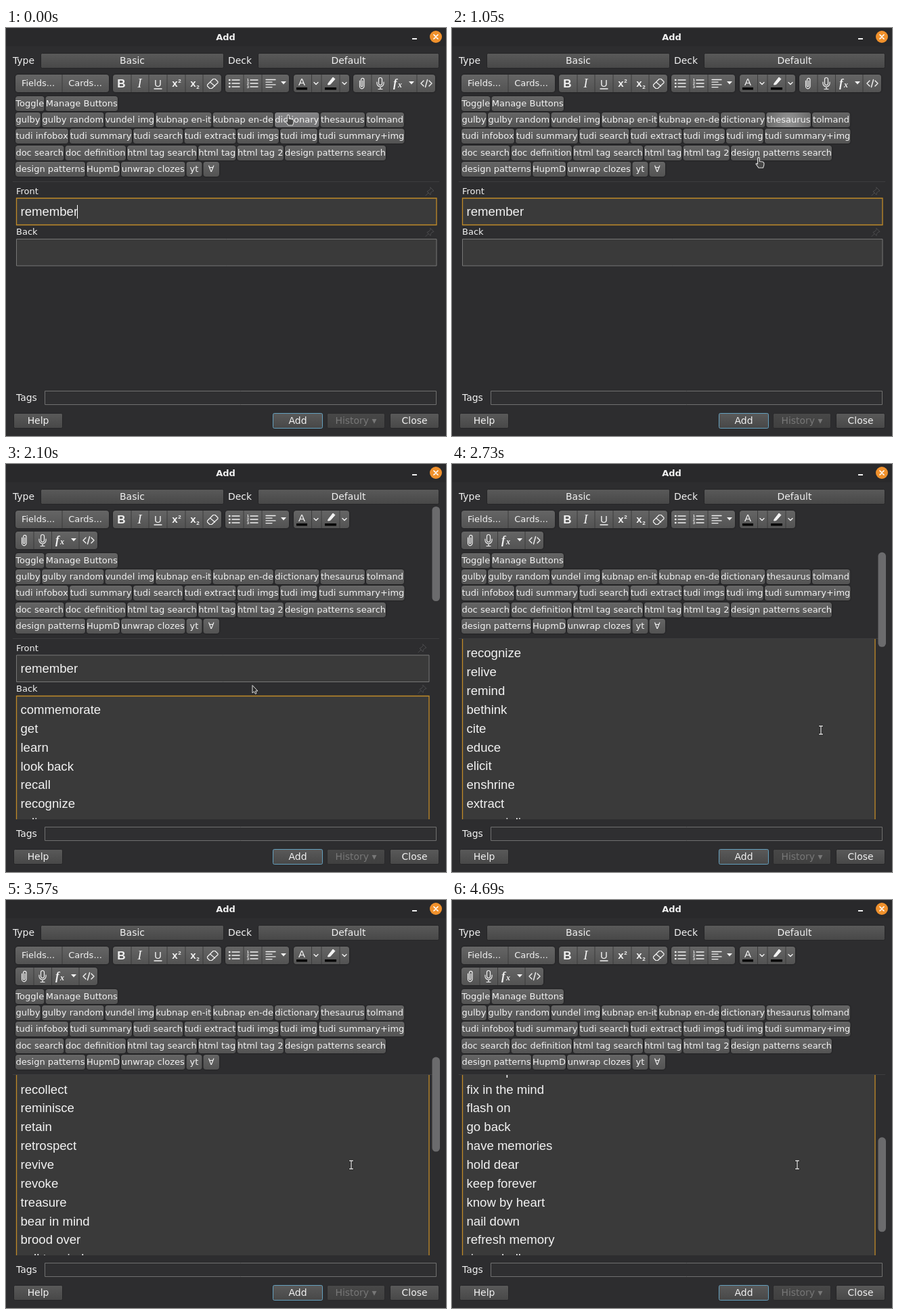
Recreate the animation shown at these times as an HTML page with a canvas. Size 650 px wide and 604 px high, loop 4830 ms.

```html
<!DOCTYPE html>
<html lang="en">
<head>
<meta charset="utf-8">
<title>Add</title>
<style>
html, body { margin: 0; width: 650px; height: 604px; overflow: hidden; background: #2d2d2f; }
canvas { display: block; }
</style>
</head>
<body>
<canvas id="stage" width="650" height="604"></canvas>
<script>
const g = document.getElementById('stage').getContext('2d');
const LOOP = 4830, STEP = 70, LINE = 27.857;
const CLICKED = 700, FILLED = 1260;
const SANS = '"DejaVu Sans", sans-serif', ARIAL = '"Liberation Sans", Arial, sans-serif';
const UI = '13.93px ' + SANS, SMALL = '13px ' + SANS, FIELD = '18.57px ' + ARIAL;
const INK = '#f2f2f2', ORANGE = '#c08a28';

// Each row: labels, then left edges followed by the right end
const rows = [
  ['Toggle|Manage Buttons', [14, 58.5, 167]],
  ['gulby|gulby random|vundel img|kubnap en-it|kubnap en-de|dictionary|thesaurus|tolmand',
    [14, 53, 146.5, 221, 305.5, 397, 464.5, 532, 590]],
  ['tudi infobox|tudi summary|tudi search|tudi extract|tudi imgs|tudi img|tudi summary+img',
    [14, 94, 188, 263.5, 341.5, 405, 462, 590.5]],
  ['doc search|doc definition|html tag search|html tag|html tag 2|design patterns search',
    [14, 87.5, 179, 284, 341.5, 412, 563]],
  ['design patterns|HupmD|unwrap clozes|yt|∀', [14, 119, 170, 266.5, 291.5, 317]]
].map(([names, xs]) => ({ names: names.split('|'), xs }));

const words = ('commemorate,get,learn,look back,recall,recognize,relive,remind,bethink,cite,educe,' +
  'elicit,enshrine,extract,memorialize,memorize,mind,recollect,reminisce,retain,retrospect,revive,' +
  'revoke,treasure,bear in mind,brood over,call to mind,call up,conjure up,dig into the past,' +
  'dwell upon,fix in the mind,flash on,go back,have memories,hold dear,keep forever,' +
  'know by heart,nail down,refresh memory,ring a bell,summon up,think back').split(',');

// Keys: time, then values
const scrollKeys = [[2450, 0], [2730, 8], [3150, 14], [3290, 14], [3570, 20], [3710, 22], [4270, 22], [4690, 34]];
const mouseKeys = [[0, 419, 136], [560, 497, 138], [910, 497, 138], [1050, 455, 199], [1260, 430, 262],
  [1610, 430, 262], [1890, 392, 420], [2100, 367, 334], [2170, 367, 334], [2520, 545, 394],
  [3220, 545, 394], [3430, 510, 392]];

function track(keys, t) {
  const i = keys.findIndex(k => k[0] > t);
  if (i === 0) return keys[0].slice(1);
  if (i < 0) return keys[keys.length - 1].slice(1);
  const a = keys[i - 1], b = keys[i], p = (t - a[0]) / (b[0] - a[0]);
  return a.slice(1).map((v, n) => v + (b[n + 1] - v) * p);
}

function text(s, x, y, font, color = INK, align = 'left') {
  g.font = font;
  g.fillStyle = color;
  g.textAlign = align;
  g.fillText(s, x, y);
}

function rect(x, y, w, h, r, fill, stroke, width = 1) {
  g.beginPath();
  g.roundRect(x, y, w, h, r);
  if (fill) { g.fillStyle = fill; g.fill(); }
  if (stroke) { g.strokeStyle = stroke; g.lineWidth = width; g.stroke(); }
}

function shade(y, h, top, bottom) {
  const s = g.createLinearGradient(0, y, 0, y + h);
  s.addColorStop(0, top);
  s.addColorStop(1, bottom);
  return s;
}

function raised(x, y, w, h, r = 3, top = '#656565', bottom = '#535353') {
  g.save();
  g.shadowColor = 'rgba(0,0,0,.5)';
  g.shadowBlur = 3;
  rect(x, y, w, h, r, shade(y, h, top, bottom));
  g.restore();
}

function path(d, x, y, stroke = INK, width = 1.3, fill) {
  const p = new Path2D(d);
  g.save();
  g.translate(x, y);
  g.lineJoin = g.lineCap = 'round';
  if (fill) { g.fillStyle = fill; g.fill(p); }
  if (stroke) { g.strokeStyle = stroke; g.lineWidth = width; g.stroke(p); }
  g.restore();
}

function qtButton(label, x, y, w, border = '#252527', color = INK, flat) {
  rect(x + .5, y + .5, w - 1, 22, 2, flat ? shade(y, 22, '#484848', '#404040') : shade(y, 22, '#5a5a5a', '#484848'), border);
  text(label, x + w / 2, y + 16, UI, color, 'center');
}

function group(x, y, ...edges) {
  const w = edges[edges.length - 1];
  raised(x, y, w, 26, 4);
  g.fillStyle = '#3c3c3c';
  for (const e of edges.slice(0, -1)) g.fillRect(x + e - .5, y, 1, 26);
}

const caret = (x, y) => path('M-4 -2H4L0 2.5Z', x, y, null, 0, INK);
const chevron = (x, y) => path('M-3 -1.5L0 1.5L3 -1.5', x, y, INK, 1.4);

function insertTools(x, y) {
  group(x, y, 27, 53.5, 94, 121);
  path('M-3 -4V4A3 3.5 0 0 0 3.5 4V-5A2.2 2.5 0 0 0 -1 -5V3.5A1 1.2 0 0 0 1.3 3.5V-4', x + 12.5, y + 13, INK, 1.2);
  path('M-2.5 -6A2.5 2.5 0 0 1 2.5 -6V0A2.5 2.5 0 0 1 -2.5 0ZM-5 -2V0A5 5 0 0 0 5 0V-2M0 5V8.5M-3 8.5H3', x + 40, y + 13, INK, 1.2);
  text('f', x + 59, y + 18, 'italic bold 17px "Liberation Serif", serif');
  text('x', x + 66, y + 19, 'italic bold 12px "Liberation Serif", serif');
  caret(x + 86, y + 12);
  path('M-4 -4L-8 0L-4 4M4 -4L8 0L4 4M1.5 -5.5L-1.5 5.5', x + 108, y + 13, INK, 1.4);
}

function toolbar(wrapped) {
  const y = 69, m = 82;
  group(14, y, 69, 138);
  text('Fields...', 47.5, 86, SMALL, INK, 'center');
  text('Cards...', 117, 86, SMALL, INK, 'center');

  group(158, y, 27, 53, 80, 107, 133, 160);
  text('B', 170.5, 88, 'bold 17px ' + ARIAL, INK, 'center');
  text('I', 197.5, 88, 'italic 19px "Liberation Serif", serif', INK, 'center');
  text('U', 224.5, 87, '15px ' + ARIAL, INK, 'center');
  path('M-5.5 0H5.5', 224.5, 90);
  text('x', 249.5, 87, 'bold 15px ' + ARIAL, INK, 'center');
  text('2', 256.5, 81, 'bold 8px ' + ARIAL, INK, 'center');
  text('x', 276.5, 87, 'bold 15px ' + ARIAL, INK, 'center');
  text('2', 283.5, 90, 'bold 8px ' + ARIAL, INK, 'center');
  path('M-7.5 2L1 -6.5H4L8 -2.5V-1L-1 7.5H-4L-7.5 4ZM-3.5 -2L3.5 4', 305, m, INK, 1.2);

  group(324, y, 27, 54, 94);
  for (const d of [-5, 0, 5]) {
    path('M-3 0H8', 337, m + d, INK, 1.4);
    path('M-7 0H-6.5', 337, m + d, INK, 2.4);
    path('M-3 0H8', 364, m + d, INK, 1.4);
    text(d / 5 + 2, 357.5, m + d + 2, 'bold 6px ' + ARIAL, INK, 'center');
  }
  [14, 9, 14, 9].forEach((w, i) => path(`M0 0H${w}`, 384, 76.5 + i * 3.7, INK, 1.3));
  caret(410, 81);

  group(425, y, 26.5, 41, 68, 82);
  text('A', 437, 85, '15px ' + ARIAL, INK, 'center');
  path('M-4 3L3 -6L6 -3.5L-1 4.5L-4 5Z', 480, 79, INK, 1, INK);
  g.fillStyle = '#000';
  g.fillRect(429, 88, 16, 3.5);
  g.fillRect(471, 88, 17, 3.5);
  chevron(458, m);
  chevron(500, m);
  wrapped ? insertTools(14, 100) : insertTools(513, y);
}

function actions(dy, hot, glow) {
  rows.forEach(({ names, xs }, r) => names.forEach((name, i) => {
    const x = xs[i], w = xs[i + 1] - x - 2, y = Math.round(101.1 + r * 24.14) + dy;
    if (name === hot) raised(x, y, w, 22, 4, '#858587', '#717173');
    else raised(x, y, w, 22, 4);
    if (name === glow) {
      const s = g.createRadialGradient(x + w / 2, y + 11, 2, x + w / 2, y + 11, w / 2);
      s.addColorStop(0, '#929292');
      s.addColorStop(1, '#6a6a6a');
      rect(x, y, w, 22, 4, s);
    }
    text(name, x + w / 2, y + 15, SMALL, INK, 'center');
  }));
}

const pin = (x, y) => path('M1 -6L6 -1L4 -.5L1.5 2L1 5L-4 0L-1 -1.5L1 -4ZM-2 2L-6 6', x, y, '#4b4b4d', 1);

function field(label, y, right, h, focus) {
  text(label, 15, Math.round(y + 4.6), SMALL);
  pin(right - 9.5, y + 1);
  rect(15.5, y + 11, right - 15, h, 0, '#3a3a3a', focus ? ORANGE : '#767676', focus ? 1.3 : 1);
}

function cursor(shape, x, y) {
  if (shape === 'hand')
    path('M-3.5 2V-6A1.4 1.4 0 0 1 -.7 -6V-1.5L3.5 -1Q6 -.5 6 2Q6 5 4.5 8H-2L-6 2.5Q-6 .5 -3.5 2.5', x, y, '#dedede', 1.1, '#454545');
  else if (shape === 'beam') {
    const d = 'M-2.5 -6H2.5M0 -6V6M-2.5 6H2.5';
    path(d, x, y, '#222', 3.2);
    path(d, x, y, '#ddd', 1.3);
  } else path('M-3 -6V5L-.5 2.8L1.5 6.5L3 5.5L1.5 2H4.5Z', x, y, '#ddd', 1, '#2a2a2a');
}

function chrome() {
  g.fillStyle = '#2d2d2f';
  g.fillRect(0, 0, 650, 604);
  g.fillStyle = '#29292b';
  g.fillRect(0, 0, 650, 27);
  text('Add', 324.5, 18, 'bold 13px ' + SANS, INK, 'center');
  g.fillRect(600, 15, 7, 2);
  g.beginPath();
  g.arc(635, 13, 9, 0, 7);
  g.fillStyle = '#f0912c';
  g.fill();
  path('M-3 -3L3 3M3 -3L-3 3', 635, 13, '#fff', 1.7);

  text('Type', 10, 53, UI);
  qtButton('Basic', 51, 37, 271);
  text('Deck', 328, 53, UI);
  qtButton('Default', 372, 37, 268);

  text('Tags', 15, 552, UI);
  rect(57.5, 537.5, 578, 20, 0, '#2f2f31', '#707070');
  qtButton('Help', 11, 570, 73);
  qtButton('Add', 394, 570, 74, '#64a0be');
  qtButton('History ▾', 474, 570, 86, '#29292b', '#777', true);
  qtButton('Close', 567, 570, 73);
}

function editor(t, filled, dy) {
  const lines = Math.round(track(scrollKeys, t)[0]), top = Math.round(lines * LINE);
  const right = filled ? 624.5 : 635.5;
  g.save();
  g.beginPath();
  g.rect(0, 228 + dy, 650, 298 - dy);
  g.clip();
  g.translate(0, dy - top);
  field('Front', 241, right, 39.5, !filled);
  text('remember', 21.5, 278, FIELD);
  if (t < 490) { g.fillStyle = '#fff'; g.fillRect(105, 262, 1, 20); }
  field('Back', 301.5, right, filled ? 1240 : 39.5, filled);
  if (filled) words.forEach((w, i) => text(w, 21.5, Math.round(339 + i * LINE), FIELD));
  g.restore();
  g.fillStyle = '#3d3d3f';
  g.fillRect(10, 227 + dy, 630, 1);
  if (filled) rect(629.5, 63 + lines * 8.48, 11.5, 140, 5.5, '#6b6b6d');
}

function draw(t) {
  const filled = t >= FILLED, dy = filled ? 31 : 0;
  const [x, y] = track(mouseKeys, t);
  const over = !filled && y < 148 && (x < 464 ? 'dictionary' : 'thesaurus');
  chrome();
  editor(t, filled, dy);
  toolbar(filled);
  actions(dy, over, !filled && t >= CLICKED && 'thesaurus');
  const beam = filled && y > 343;
  cursor(beam ? 'beam' : filled ? 'arrow' : 'hand', x, y);
}

function frame(now) {
  const t = Math.floor((now % LOOP) / STEP) * STEP;
  draw(Math.min(t, 4690));
  requestAnimationFrame(frame);
}
requestAnimationFrame(frame);
</script>
</body>
</html>
```
